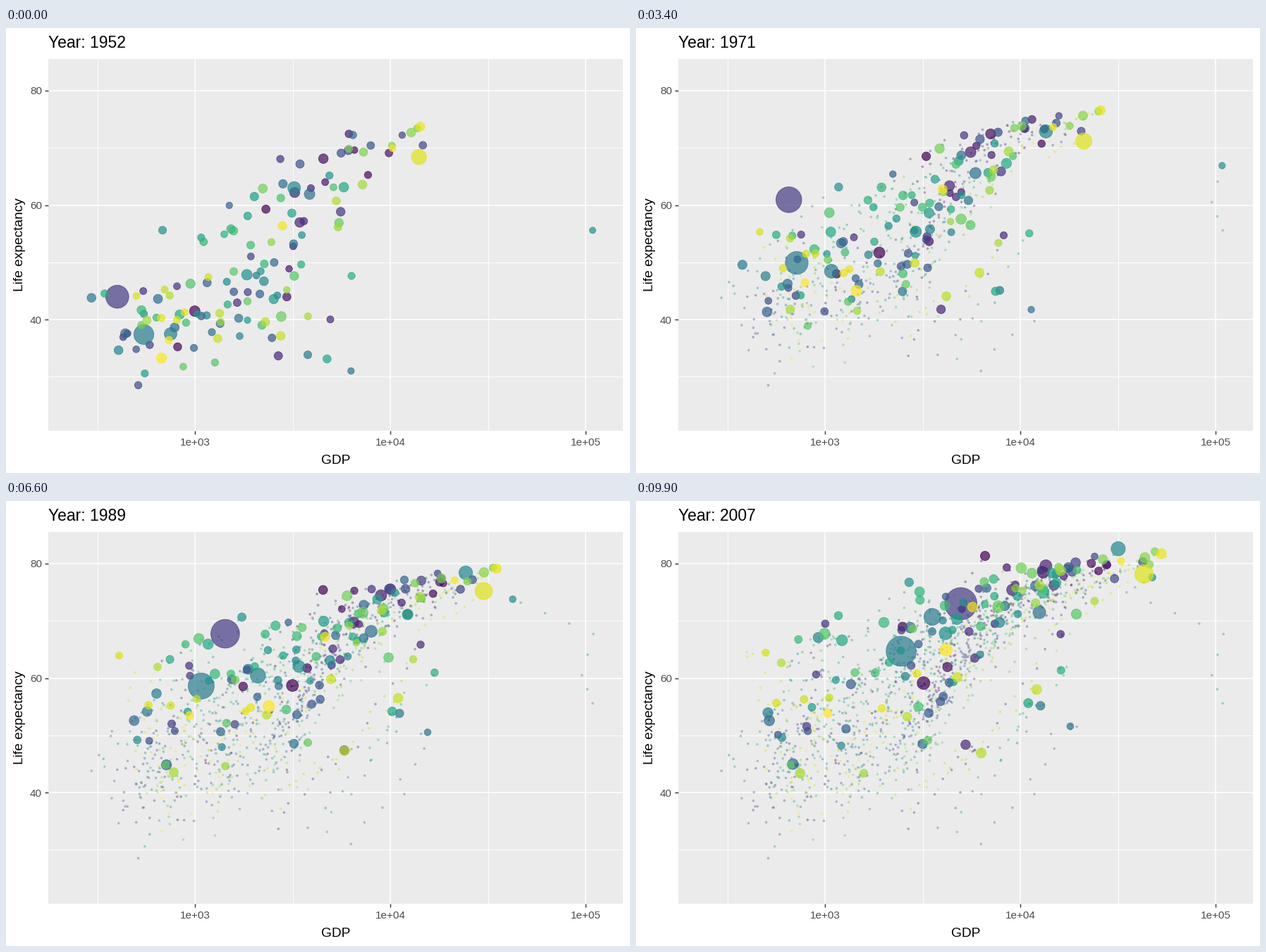
A matplotlib script that plays this animation: 885x632 px, repeating every 10000 ms.

```python
import numpy as np
import matplotlib.pyplot as plt
from matplotlib.animation import FuncAnimation

W, H, DPI = 885, 632, 100
PX = 72 / DPI                      # points per pixel
SURVEYS, STEP, FRAMES = 12, 9, 100
COUNT = 142                        # nations, ranked by colour
POP_MIN, POP_MAX = 0.06, 1318.7    # millions
T = np.linspace(0, 1, SURVEYS)
KNOTS = [0, 2, 4, 8, 11]

plt.rcParams["font.family"] = "Liberation Sans"

# rank, first and last population, income and life expectancy at the knots
GIANTS = [
    (24, 556, 1319, [400, 488, 677, 1656, 4959], [44, 44.5, 63, 68.7, 73]),
    (58, 372, 1110, [547, 658, 724, 1164, 2452], [37.4, 43.6, 50.7, 60.2, 64.7]),
    (134, 158, 301, [13990, 16173, 21806, 32004, 42952], [68.4, 70.2, 71.3, 76, 78.2]),
    (71, 0.16, 2.5, [108382, 95458, 109348, 34933, 47307], [55.6, 60.5, 67.7, 75, 77.6]),
    (66, 86, 127, [3217, 6577, 14779, 26825, 31656], [63, 68.7, 73.4, 79.4, 82.6]),
    (59, 82, 224, [750, 849, 1111, 2383, 3541], [37.5, 42.5, 49.2, 62.7, 70.7]),
]

# size, share of time spent growing, link between income and life,
# then (mean, spread) at the start and end for log income and for life
REGIONS = [
    (48, 0.65, 0.35, (2.97, 0.27), (3.15, 0.38), (39.5, 5.0), (55, 8.5)),
    (27, 1.00, 0.80, (3.72, 0.25), (4.35, 0.22), (67.0, 5.0), (80, 2.5)),
    (26, 1.00, 0.60, (3.46, 0.20), (3.92, 0.24), (54.0, 8.5), (74, 4.0)),
    (28, 1.00, 0.50, (3.10, 0.32), (3.65, 0.45), (47.0, 9.0), (71, 6.0)),
    (7, 0.70, 0.20, (3.68, 0.15), (4.15, 0.17), (41.0, 6.0), (65, 8.0)),
]


def growth(first, last):
    return first * (last / first) ** T


def giant(rank, first, last, income, life):
    t = np.arange(SURVEYS)
    return (rank, np.interp(t, KNOTS, np.log10(income)),
            np.interp(t, KNOTS, life), growth(first, last))


def path(start, end, z0, z1, rise):
    """Travel between two draws from (mean, spread) pairs."""
    a, b = start[0] + start[1] * z0, end[0] + end[1] * z1
    return a + (b - a) * rise


def nation(rank, rng, span, link, x0, x1, y0, y1):
    wealth, luck, health, drift, bulk = np.clip(rng.normal(size=5), -1.8, 1.8)
    rich = np.clip(0.85 * wealth + 0.5 * luck, -1.6, 1.6)
    rest = np.sqrt(1 - link ** 2)
    fit0 = link * wealth + rest * health
    fit1 = link * rich + rest * (0.6 * health + 0.8 * drift)
    rise = np.minimum(1, T / span) ** 0.9
    income = path(x0, x1, wealth, rich, rise) + rng.normal(0, 0.03, SURVEYS)
    life = path(y0, y1, fit0, fit1, rise) + rng.normal(0, 0.3, SURVEYS)
    ceiling = 74 + 8.5 * T
    life = ceiling - 2 * np.logaddexp(0, (ceiling - life) / 2)
    pop = 4.5 * np.exp(1.2 * bulk)
    return rank, np.maximum(income, 2.47), life, growth(pop, 2.2 * pop)


def build():
    rng = np.random.default_rng(11)
    rows = [giant(*g) for g in GIANTS]
    taken = [r[0] for r in rows]
    free = iter(rng.permutation(np.setdiff1d(np.arange(COUNT), taken)))
    for n, *rule in REGIONS:
        rows += [nation(next(free), rng, *rule) for _ in range(n)]
    rows.sort(key=lambda r: r[0])
    return [np.array(col) for col in zip(*rows)]


def diameter(mm):
    """Marker width in points for a dot size in millimetres."""
    return (mm * 72.27 / 25.4 + 0.94) * 0.75 * 125 / 72 * PX


ranks, incomes, lives, pops = build()
share = np.clip((pops - POP_MIN) / (POP_MAX - POP_MIN), 0, 1)
widths = diameter(2 + 10 * np.sqrt(share))
colors = plt.get_cmap("viridis")(ranks / (COUNT - 1))

fig = plt.figure(figsize=(W / DPI, H / DPI), dpi=DPI, facecolor="white")
ax = fig.add_axes([59.7 / W, 1 - 571.5 / H, 815 / W, 527.7 / H], facecolor="#EBEBEB")
ax.set(xlim=(2.248, 5.189), ylim=(20.649, 85.553))
ax.spines[:].set_visible(False)
ax.set_axisbelow(True)
ax.set_xticks([3, 4, 5], ["1e+03", "1e+04", "1e+05"])
ax.set_xticks([2.5, 3.5, 4.5], minor=True)
ax.set_yticks([40, 60, 80])
ax.set_yticks([30, 50, 70], minor=True)
ax.grid(which="major", color="white", lw=1.5 * PX)
ax.grid(which="minor", color="white", lw=0.9 * PX)
ax.tick_params(which="minor", length=0)
ax.tick_params(which="major", length=4.8 * PX, width=1.4 * PX, color="#333333",
               labelcolor="#4D4D4D", labelsize=15.3 * PX)
ax.tick_params(axis="x", pad=5.5 * PX)
ax.tick_params(axis="y", pad=4 * PX)


def label(x, y, text, px, **kw):
    return fig.text(x / W, 1 - y / H, text, fontsize=px * PX, color="black", **kw)


title = label(60, 28, "", 22.9)
label(467.5, 619, "GDP", 19.1, ha="center")
label(20, 307.5, "Life expectancy", 19.1, ha="center", va="center", rotation=90)


def dots(k, width, alpha, z):
    rgba = colors.copy()
    rgba[:, 3] = alpha
    return ax.scatter(incomes[:, k], lives[:, k], s=width ** 2, facecolors=rgba,
                      edgecolors=rgba, linewidths=0.9 * PX, zorder=z)


trails = [dots(k, diameter(0.4), 0.3, 3) for k in range(SURVEYS)]
live = dots(0, widths[:, 0], 0.7, 4)


def between(values, k, f):
    return values[:, k] + (values[:, min(k + 1, SURVEYS - 1)] - values[:, k]) * f


def draw(i):
    k, f = i // STEP, i % STEP / STEP
    live.set_offsets(np.column_stack([between(incomes, k, f), between(lives, k, f)]))
    live.set_sizes(between(widths, k, f) ** 2)
    for n, trail in enumerate(trails):
        trail.set_visible(n * STEP < i)
    title.set_text(f"Year: {round(1952 + i * 5 / STEP)}")
    return [live, title, *trails]


anim = FuncAnimation(fig, draw, frames=FRAMES, interval=100, repeat=True, repeat_delay=0)
plt.show()
```
